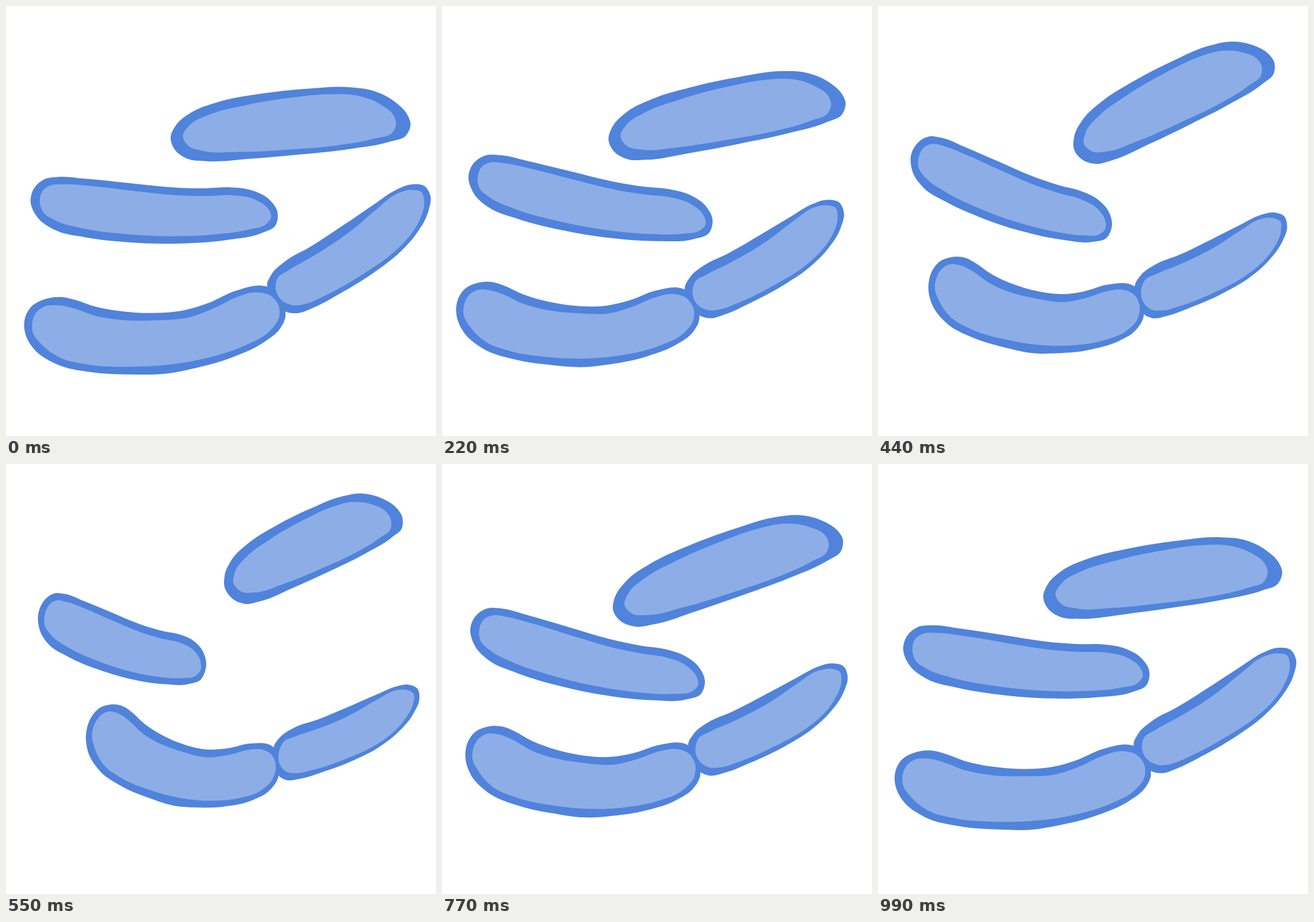
Recreate the animation shown at these times as an HTML page with a canvas. Size 700 by 700 pixels, loop 1.1 s.

```html
<!DOCTYPE html>
<html lang="en">
<head>
<meta charset="utf-8">
<title>Bacilli</title>
<style>
  html, body { margin: 0; width: 100%; height: 100%; overflow: hidden; background: #fff; }
  canvas { display: block; width: 100vw; height: 100vh; }
</style>
</head>
<body>
<canvas id="stage" width="700" height="700"></canvas>
<script>
const ctx = document.getElementById('stage').getContext('2d');
const WALL = '#5083db', BODY = '#8dade6';
const STEP = 110;

// Which pose is held in each step: out to the squeezed pose and back.
const ORDER = [0, 1, 2, 3, 4, 5, 6, 3, 2, 1];

// Smooth closed curve through "x,y" points, as a path plus samples for measuring.
function blob(text) {
  const p = text.trim().split(/\s+/).map(s => s.split(',').map(Number));
  const n = p.length;
  const seg = p.map((q, i) => {
    const r = p[(i + 1) % n], dx = r[0] - q[0], dy = r[1] - q[1], len = Math.hypot(dx, dy);
    return { len, x: dx / len, y: dy / len };
  });
  const tan = p.map((_, i) => {
    const u = seg[(i + n - 1) % n], v = seg[i], sum = u.len + v.len;
    return [(u.x * v.len + v.x * u.len) / sum, (u.y * v.len + v.y * u.len) / sum];
  });
  const path = new Path2D(), samples = [];
  path.moveTo(...p[0]);
  p.forEach((a, i) => {
    const j = (i + 1) % n, d = p[j], h = seg[i].len * 0.345;
    const b = [a[0] + tan[i][0] * h, a[1] + tan[i][1] * h];
    const c = [d[0] - tan[j][0] * h, d[1] - tan[j][1] * h];
    path.bezierCurveTo(...b, ...c, ...d);
    for (let k = 0; k < 16; k++) {
      const t = k / 16, s = 1 - t;
      samples.push([0, 1].map(m =>
        s * s * s * a[m] + 3 * s * s * t * b[m] + 3 * s * t * t * c[m] + t * t * t * d[m]));
    }
  });
  path.closePath();
  return { path, samples };
}

// Slant the group by (kx, ky), then scale it into the pose's box.
function matrix(samples, [left, top, right, bottom, kx, ky]) {
  let x0 = Infinity, x1 = -Infinity, y0 = Infinity, y1 = -Infinity;
  for (const [x, y] of samples) {
    const u = x + kx * y, v = y + ky * x;
    x0 = Math.min(x0, u); x1 = Math.max(x1, u);
    y0 = Math.min(y0, v); y1 = Math.max(y1, v);
  }
  const sx = (right - left) / (x1 - x0), sy = (bottom - top) / (y1 - y0);
  return [sx, sy * ky, sx * kx, sy, left - sx * x0, top - sy * y0];
}

function group(walls, bodies, poses) {
  walls = walls.map(blob);
  bodies = bodies.map(blob);
  const samples = walls.flatMap(w => w.samples);
  return { walls, bodies, poses: poses.map(p => matrix(samples, p)) };
}

const upper = group([
  `268,215 276,195 300,174 345,156 410,143 490,134 560,131.5 600,138 635,157 654,178
   658.5,192 651,211 625,221 560,233 480,242 400,249 325,253 295,249 274,233`
], [
  `288,212 300,193 330,177 390,161 470,148 530,143 575,146 610,160 631,178 635,192
   629,206 600,216 540,227 460,234 380,238 320,236 297,228`
], [
  [268, 131.5, 658.5, 253, 0, 0],
  [269, 119, 658, 252, 0.047, -0.047],
  [271, 106, 657, 251, 0.098, -0.098],
  [278, 83, 653, 265, 0.249, -0.249],
  [318, 58, 646, 257, 0.4, -0.34],
  [355, 48, 646, 228, 0.45, -0.27],
  [301, 59.5, 646, 267, 0.395, -0.365]
]);

const middle = group([
  `40,317 46,296 62,282 85,278 130,281 200,288 270,295 325,296.5 365,295 400,300
   428,315 441,335 438,357 415,370 360,381 280,387 200,385 130,377 80,365 52,345`
], [
  `55,317 60,300 72,292 95,290 140,293 210,301 280,308 330,309 370,308 405,315
   426,330 431,343 424,354 395,364 340,372 270,375 190,371 120,361 80,349 60,335`
], [
  [40, 278, 442.5, 387, 0, 0],
  [41, 262.5, 442, 382, -0.05, 0.05],
  [43, 242, 440.5, 383, -0.14, 0.14],
  [46, 234, 428, 386, -0.19, 0.18],
  [53, 212, 381, 385, -0.356, 0.267],
  [52, 210, 326, 360, -0.37, 0.19],
  [53, 212, 397, 393, -0.35, 0.292]
]);

const bent = [29.5, 290, 691.5, 600, 0, 0];
const half = [82, 336, 666, 566, -0.275, 0.19];
const chain = group([
  `30,510 40,490 60,478 90,473.5 108,477 145,489 190,497 240,499.5 290,495 330,483
   375,463 420,455.5 440,463 452,485 455,505 446,525 420,547 370,571 300,591 270,597
   200,599.5 140,596 80,582 45,558 31,533`,
  `425,455 432,437 455,415 495,392 550,356 600,322 635,299 660,290 682,293 691,308
   688,333 670,368 642,400 600,433 540,470 500,491 472,500 455,497 440,482 430,468`
], [
  `42,520 48,500 60,490 85,487 110,492 145,504 190,511 240,511.5 300,506 340,491
   375,474 405,466 430,471 444,488 445,505 428,530 390,552 330,572 270,583 200,587
   130,583 85,571 55,548 44,533`,
  `439,455 442,443 460,430 500,407 560,367 605,329 635,306 662,299 676,302 681,318
   674,347 655,377 632,400 580,437 520,471 490,484 468,487 448,478 440,465`
], [
  bent,
  [27, 299, 681, 596, -0.028, 0.027],
  [23, 315.5, 654.5, 588, -0.095, 0.085],
  [38, 324.5, 660.5, 575.5, -0.175, 0.14],
  half,
  [130, 359, 673, 559.5, -0.45, 0.257],
  half
]);

function draw(now) {
  const pose = ORDER[Math.floor(now / STEP) % ORDER.length];
  ctx.setTransform(1, 0, 0, 1, 0, 0);
  ctx.fillStyle = '#fff';
  ctx.fillRect(0, 0, 700, 700);
  for (const g of [upper, middle, chain]) {
    ctx.setTransform(...g.poses[pose]);
    ctx.fillStyle = WALL;
    g.walls.forEach(w => ctx.fill(w.path));
    ctx.fillStyle = BODY;
    g.bodies.forEach(b => ctx.fill(b.path));
  }
}

const start = performance.now();
function tick() {
  draw(performance.now() - start);
  requestAnimationFrame(tick);
}
tick();
</script>
</body>
</html>
```
